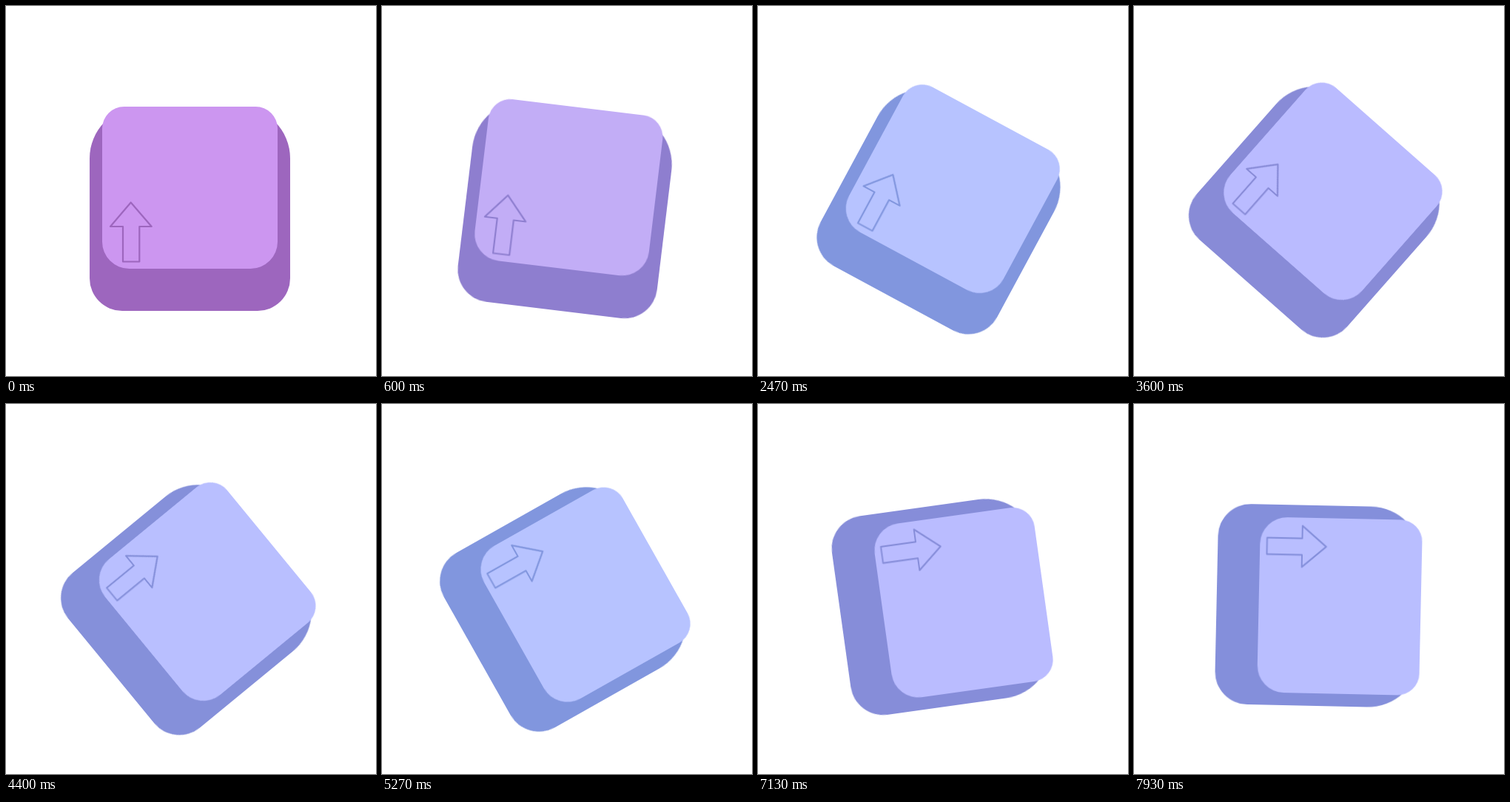
Write an HTML page that moves like this. It is 500x500 px and loops after 8000 ms.

```html
<!DOCTYPE html>
<html lang="en">
<head>
<meta charset="utf-8">
<title>Turning key</title>
<style>
  html, body { margin: 0; width: 100%; height: 100%; overflow: hidden; background: #fff; }
  svg { display: block; width: 100%; height: 100%; }

  /* The small negative delay keeps each step on its 10 ms tick. */
  .key {
    transform-origin: 249.7px 273.8px;
    animation: turn 8s steps(120, end) -4ms infinite, shade 8s linear -4ms infinite;
  }
  .side { fill: currentColor; }
  .face { animation: tint 8s linear -4ms infinite; }
  .arrow { fill: none; stroke: currentColor; stroke-width: 2.2; stroke-linejoin: round; }

  @keyframes turn { from { transform: rotate(0deg); } to { transform: rotate(92deg); } }

  @keyframes shade {
    0% { color: #9d66be; }
    17.5% { color: #7b9de5; }
    30.9% { color: #8196de; }
    45% { color: #888bd7; }
    65.9% { color: #8196de; }
    80% { color: #888bd7; }
    99.1%, 100% { color: #848fdb; }
  }
  @keyframes tint {
    0% { fill: #cc96f0; }
    17.5% { fill: #b4cbff; }
    30.9% { fill: #b7c3ff; }
    45% { fill: #babbff; }
    65.9% { fill: #b7c3ff; }
    80% { fill: #babbff; }
    99.1%, 100% { fill: #b9beff; }
  }
</style>
</head>
<body>
<svg viewBox="0 0 500 500">
  <g class="key">
    <path class="side" d="M113 206a70 70 0 0 1 70-70H314a70 70 0 0 1 70 70V368a44 44 0 0 1-44 44H157a44 44 0 0 1-44-44Z"/>
    <path class="face" d="M130 165.500a29.500 29.500 0 0 1 29.500-29.500H337.500a29.500 29.500 0 0 1 29.500 29.500V318.500a36.500 36.500 0 0 1-36.500 36.500H166.500a36.500 36.500 0 0 1-36.500-36.500Z"/>
    <path class="arrow" d="M158 345.500V298H141L168.700 265.500 196.700 298H180.300V345.500Z"/>
  </g>
</svg>
</body>
</html>
```
